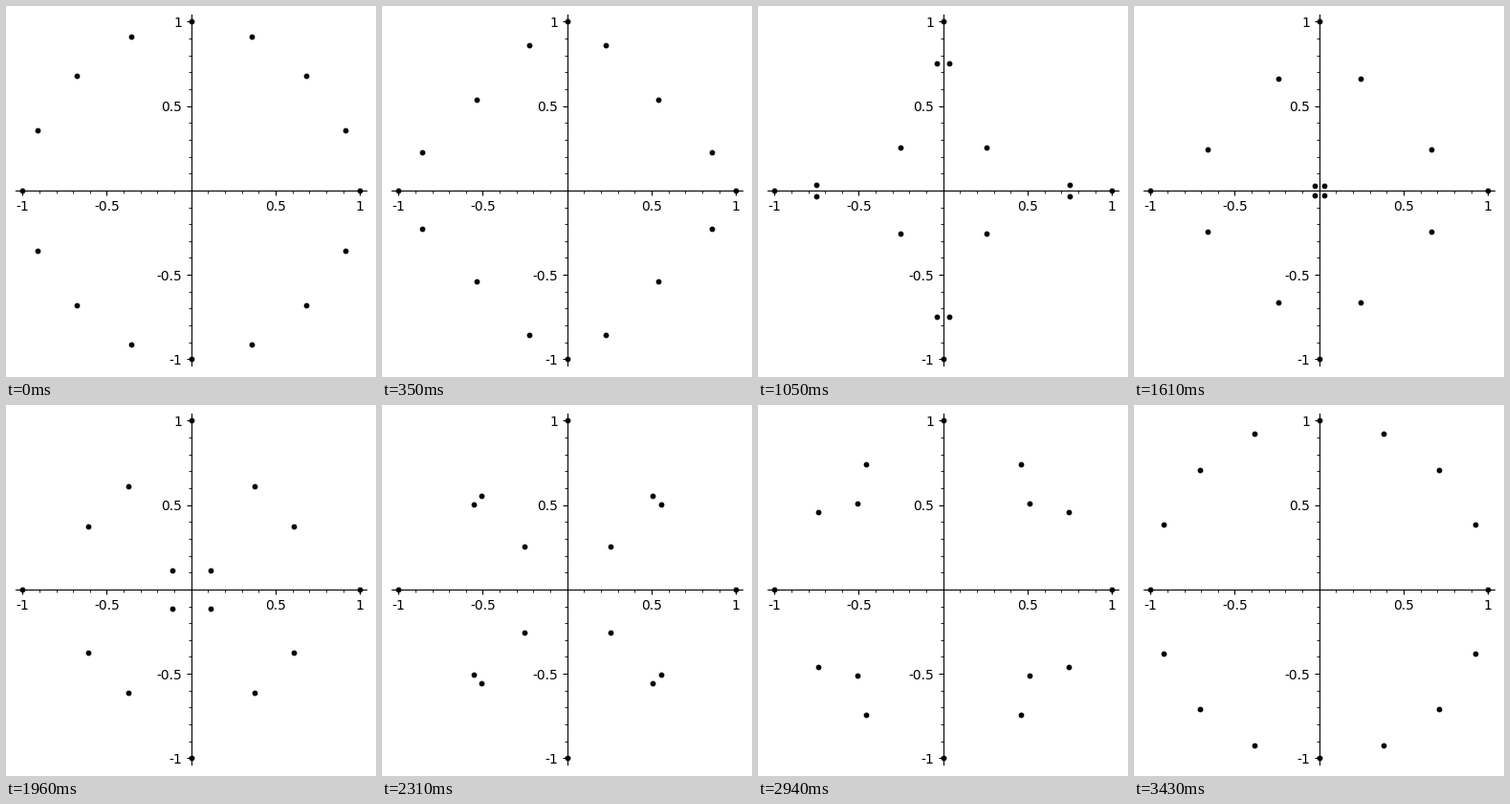
These frames come from a looping animation (387x388 px, 3.5 s). A matplotlib script:

```python
import numpy as np
import matplotlib.pyplot as plt
from matplotlib.animation import FuncAnimation
from matplotlib.ticker import AutoMinorLocator

WIDTH, HEIGHT, DPI = 387, 388, 100
FRAMES, INTERVAL = 50, 70
UNIT = 176.5                  # pixels per data unit
CENTER = 193.73, 192.85       # origin in pixels, from the top left
LIMIT = 1.04

plt.rcParams.update({
    "font.family": "DejaVu Sans",
    "font.size": 10,
    "axes.unicode_minus": False,
})

# Each 16th root of unity moves in a straight line to its 13th power.
roots = np.exp(2j * np.pi * np.arange(16) / 16)
ends = roots ** 13


def positions(frame):
    t = (frame + 1) / FRAMES
    z = (1 - t) * roots + t * ends
    return np.column_stack([z.real, z.imag])


def make_axes(fig):
    half = LIMIT * UNIT
    ax = fig.add_axes([
        (CENTER[0] - half) / WIDTH,
        (HEIGHT - CENTER[1] - half) / HEIGHT,
        2 * half / WIDTH,
        2 * half / HEIGHT,
    ])
    ax.set(xlim=(-LIMIT, LIMIT), ylim=(-LIMIT, LIMIT))
    for side in ("left", "bottom"):
        ax.spines[side].set_position(("data", 0))
    for side in ("right", "top"):
        ax.spines[side].set_visible(False)
    ticks = np.array([-1, -0.5, 0, 0.5, 1])
    labels = [f"{v:g}" if v else "" for v in ticks]
    for axis in (ax.xaxis, ax.yaxis):
        axis.set_ticks(ticks, labels=labels)
        axis.set_minor_locator(AutoMinorLocator(5))
    return ax


fig = plt.figure(figsize=(WIDTH / DPI, HEIGHT / DPI), dpi=DPI, facecolor="white")
ax = make_axes(fig)
dots = ax.scatter(*positions(0).T, s=10, c="black", zorder=5)


def update(frame):
    dots.set_offsets(positions(frame))
    return (dots,)


anim = FuncAnimation(fig, update, frames=FRAMES, interval=INTERVAL,
                     init_func=lambda: update(0), repeat=True, repeat_delay=0)
plt.show()
```
